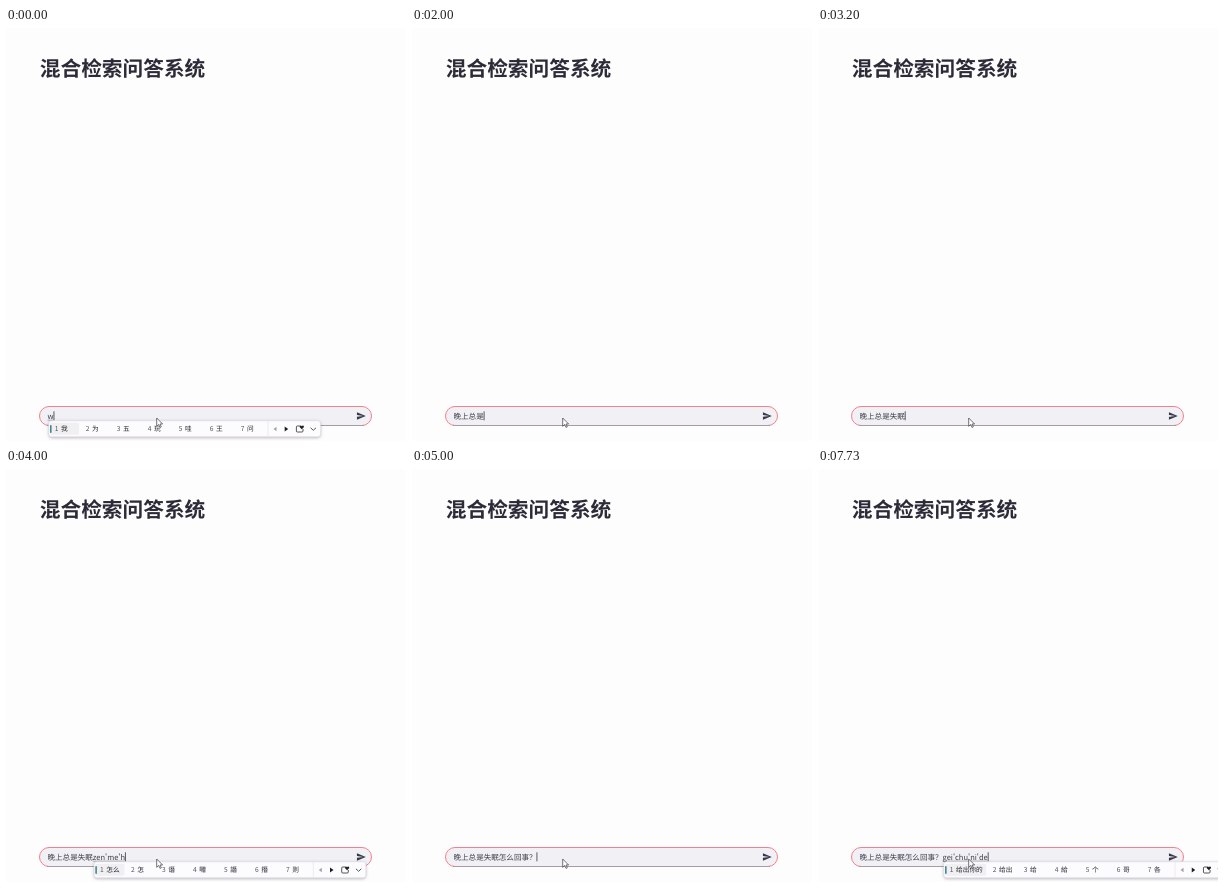
These frames come from a looping animation (400 by 413 pixels, 8 s). An HTML page:

```html
<!DOCTYPE html>
<html lang="zh-CN">
<head>
<meta charset="utf-8">
<title>混合检索问答系统</title>
<style>
html, body { margin: 0; width: 100%; height: 100%; overflow: hidden; background: #fefdfe; }
svg { display: block; width: 400px; height: 413px; }
text { font-family: "Noto Sans CJK SC", "Noto Sans CJK", sans-serif; text-rendering: geometricPrecision; white-space: pre; }
.title { font-size: 20.7px; font-weight: 700; fill: #2b2c37; }
.field { font-size: 7.55px; fill: #3c3d49; }
.cand text { font-size: 6.7px; font-weight: 500; fill: #26262c; }
.cand .num { font-weight: 400; fill: #55555c; }
.panel { fill: #fcfbfd; stroke: #dddae0; stroke-width: .5; filter: drop-shadow(0 1.5px 1.8px rgba(50, 45, 65, .32)); }
</style>
</head>
<body>
<svg viewBox="0 0 400 413">
  <text class="title" x="33.8" y="47.9">混合检索问答系统</text>

  <rect x="33.5" y="378.5" width="332" height="19" rx="9.5" fill="#f0f0f5" stroke="#f5808d"/>
  <path d="M41 397.5H358" stroke="#a99ba4"/>
  <path transform="translate(350.1 382.9) scale(.42)" d="M2 21 23 12 2 3v7l15 2-15 2z" fill="#383849"/>

  <text class="field" id="field" x="41.5" y="390.6"></text>
  <path id="underline" stroke="#66666f" stroke-width=".5"/>
  <path id="caret" stroke="#33343f" stroke-width=".8"/>

  <g id="popup">
    <rect class="panel" id="panel" x="1.3" y="392.8" height="16" rx="3"/>
    <rect id="highlight" x="2.6" y="394.8" height="12" rx="2" fill="#f0eff2"/>
    <rect x="2.6" y="397" width="1.4" height="8" rx=".7" fill="#2b7787"/>
    <g class="cand" id="cands"></g>
    <g id="tools" fill="none" stroke="#2c2c32" stroke-width=".8">
      <path d="M220.5 393V408.6" stroke="#e2e0e5" stroke-width=".6"/>
      <path d="M229 398.8v4.4l-3-2.2z" fill="#a3a2a8" stroke="none"/>
      <path d="M237.2 398.6v4.8l3.5-2.4z" fill="#1d1d22" stroke="none"/>
      <path d="M252.5 398h-2.6q-1 0-1 1v4q0 1 1 1h4.6q1 0 1-1v-2"/>
      <path d="M254.3 401.2l-2-2q-.5-1.5.8-1.7.8 0 1.2.7.4-.7 1.2-.7 1.300.2.8 1.700z" fill="#1d1d22" stroke="none"/>
      <path d="M263.100 399.800l2.700 2.500 2.700-2.500"/>
    </g>
  </g>

  <path d="M150.700 390v8.300l2-1.800 1.300 2.900 1.300-.6-1.300-2.800h2.600z" fill="#fff" stroke="#39383f" stroke-width=".7" stroke-linejoin="round"/>
</svg>
<script>
const LOOP = 8000, LEFT = 41.5, EM = 7.55, CELL = 31, CAND_EM = 6.7;
const $ = id => document.getElementById(id);

// start time, committed text, pinyin being composed, candidates
const steps = [
  [0, "", "w", "我 为 五 玩 哇 王 问"],
  [70, "", "wa", "哇 挖 娃 瓦 袜 蛙 洼"],
  [200, "", "wan", "完 万 晚 玩 碗 弯 湾"],
  [870, "", "wan's", "晚上 完善 万岁 玩耍 万事 完 万"],
  [1000, "", "wan'sh", "晚上 完善 完事 玩耍 万事 万世 玩啥"],
  [1270, "", "wan'sh'z", "晚上在 晚上 完善 完事 玩耍 万事 万世"],
  [1600, "", "wan'sh'zo", "晚上走 晚上 完善 完事 玩耍 万事 万世"],
  [1730, "", "wan'sh'zo's", "晚上总 晚上 完善 完事 玩耍 万事 万世"],
  [1870, "晚上总是", "", ""],
  [2730, "晚上总是", "s", "是 上 说 三 时 四 所"],
  [2870, "晚上总是", "shi", "是 时 事 使 十 市 式"],
  [3000, "晚上总是", "shi'm", "失眠 什么 市民 使命 世面 是 时"],
  [3200, "晚上总是失眠", "", ""],
  [3400, "晚上总是失眠", "z", "在 这 做 中 再 只 最"],
  [3470, "晚上总是失眠", "ze", "则 责 择 泽 仄 啧 怎"],
  [3670, "晚上总是失眠", "zen", "怎么 怎么办 怎么样 怎样 怎 谮 则"],
  [3730, "晚上总是失眠", "zen'me", "怎么 怎么办 怎么样 怎 谮 囎 譖"],
  [4000, "晚上总是失眠", "zen'me'h", "怎么 怎 谮 囎 譖 撍 则"],
  [4200, "晚上总是失眠", "zen'me'hu", "怎么回事 怎么会 怎么回 怎么换 怎么花 怎么 怎"],
  [4270, "晚上总是失眠", "zen'me'hui", "怎么回事 怎么会 怎么回 怎么惠 怎么汇 怎么 怎"],
  [4530, "晚上总是失眠", "zen'me'hui's", "怎么回事 怎么会 怎么回 怎么惠 怎么汇 怎么 怎"],
  [4870, "晚上总是失眠怎么回事", "", ""],
  [5000, "晚上总是失眠怎么回事？", "", ""],
  [6930, "晚上总是失眠怎么回事？", "g", "个 给 过 国 高 该 更"],
  [7000, "晚上总是失眠怎么回事？", "gei", "给 給 个 哥 各 革 格"],
  [7470, "晚上总是失眠怎么回事？", "gei'ch", "给出 给 給 个 哥 各 格"],
  [7730, "晚上总是失眠怎么回事？", "gei'chu'ni'de", "给出你的 给出 给 給 个 哥 各"]
];

function addText(x, str, cls) {
  const el = document.createElementNS("http://www.w3.org/2000/svg", "text");
  el.setAttribute("x", x);
  el.setAttribute("y", 403.4);
  if (cls) el.setAttribute("class", cls);
  el.textContent = str;
  $("cands").append(el);
}

function showPopup(x, words) {
  $("cands").replaceChildren();
  let pos = 0;
  words.forEach((word, i) => {
    const cell = Math.max(CELL, word.length * CAND_EM + 16.2);
    addText(pos + 7.3, i + 1, "num");
    addText(pos + 13.5, word);
    if (!i) $("highlight").setAttribute("width", cell - 2);
    pos += cell;
  });
  const extra = pos - CELL * words.length;
  $("panel").setAttribute("width", 271.7 + extra);
  $("tools").setAttribute("transform", `translate(${extra} 0)`);
  $("popup").setAttribute("transform", `translate(${x} 0)`);
}

function show([, done, pinyin, words]) {
  const field = $("field"), start = LEFT + done.length * EM;
  field.textContent = done + pinyin;
  const end = LEFT + field.getComputedTextLength();
  $("caret").setAttribute("d", `M${end + .4} 383.300V392.300`);
  $("underline").setAttribute("d", pinyin ? `M${start} 392.200H${end}` : "");
  $("popup").style.display = pinyin ? "" : "none";
  if (pinyin) showPopup(start, words.split(" "));
}

let current;
const origin = performance.now();
function tick() {
  const t = (performance.now() - origin) % LOOP;
  const step = steps.findLast(s => s[0] <= t);
  if (step !== current) show(current = step);
  requestAnimationFrame(tick);
}
tick();
</script>
</body>
</html>
```
